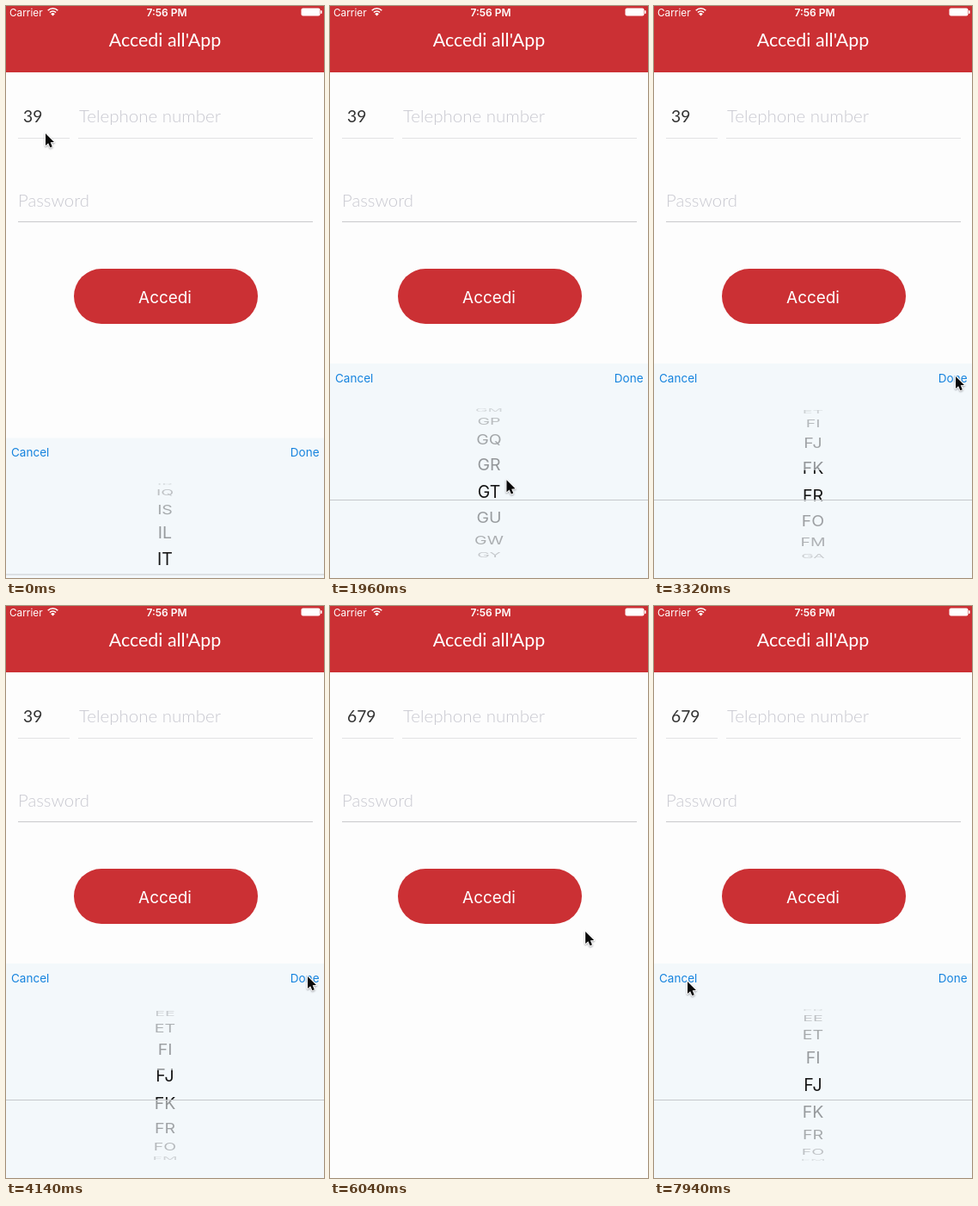
Recreate the animation shown at these times as an HTML page with a canvas. Size 370 by 664 pixels, loop 8000 ms.

```html
<!DOCTYPE html>
<html lang="it">
<head>
<meta charset="utf-8">
<title>Login country picker</title>
<style>
  html, body { margin: 0; width: 100%; height: 100%; overflow: hidden; background: #fdfdfd; }
  canvas { display: block; width: 370px; height: 664px; }
</style>
</head>
<body>
<canvas id="stage"></canvas>
<script>
const W = 370, H = 664, LOOP = 8000;
const canvas = document.getElementById('stage');
const ctx = canvas.getContext('2d');
const dpr = window.devicePixelRatio || 1;
canvas.width = W * dpr;
canvas.height = H * dpr;

const RED = '#cb3034', PAPER = '#fdfdfd', SHEET = '#f3f8fb', INK = '#333333';
const HINT = '#c8c8d0', RULE = '#c9c9cc', FAINT = '#e2e2e4', BLUE = '#1583de', WHITE = '#ffffff';
const UI = 'Inter, Roboto, sans-serif', ROUND = 'Lato, "Open Sans", sans-serif';

// Wheel rows; FJ is position 0
const CODES = ('EG ER EE ET FI FJ FK FR FO FM GA GB GE GG GH GI GN GL GM GP GQ GR GT GU GW GY ' +
  'HN HK HR HT HU ID IE IN IR IQ IS IL IT JM JE JO JP KZ KE').split(' ');
const ZERO = CODES.indexOf('FJ'), FIRST = CODES.indexOf('IT') - ZERO;
const STEP = 20.7 * Math.PI / 180, RADIUS = 88;

const DRAG = 1420, RELEASE = 1600, SETTLED = 5010;
const OPEN = -100, PRESS = 5220, DISMISS = 5340, REOPEN = 6821;
const SHEET_TOP = 415, SLIDE = 340;

// time, x, y of the pointer tip
const POINTER = [
  [350, 46, 148], [1050, 177, 499], [DRAG, 177, 499], [RELEASE, 180, 568],
  [1750, 180, 568], [2460, 300, 485], [2950, 351, 430],
  [5880, 351, 430], [6480, 47.5, 137],
  [7250, 47.5, 137], [7720, 39, 436]
];

const clamp = v => Math.min(1, Math.max(0, v));
const easeOut = u => 1 - (1 - clamp(u)) ** 3;
const smooth = u => u * u * (3 - 2 * u);
const mix = (a, b, u) => a + (b - a) * u;

function pointerAt(t) {
  const next = POINTER.findIndex(k => k[0] > t);
  if (next === 0) return POINTER[0].slice(1);
  if (next < 0) return POINTER[POINTER.length - 1].slice(1);
  const a = POINTER[next - 1], b = POINTER[next];
  const u = smooth((t - a[0]) / (b[0] - a[0]));
  return [mix(a[1], b[1], u), mix(a[2], b[2], u)];
}

function sheetAt(t) {
  const rise = start => mix(H, SHEET_TOP, easeOut((t - start) / SLIDE));
  if (t < DISMISS) return rise(OPEN);
  if (t < REOPEN) return mix(SHEET_TOP, H, easeOut((t - DISMISS) / SLIDE));
  return rise(REOPEN);
}

// Drag, then exponential deceleration
function wheelAt(t) {
  const glide = ms => Math.max(0, 7.29 * Math.exp(-1.68 * (ms - 2460) / 1000) - 0.1);
  if (t < DRAG) return FIRST;
  if (t < RELEASE) return mix(FIRST, glide(RELEASE), ((t - DRAG) / (RELEASE - DRAG)) ** 3);
  return t < SETTLED ? glide(t) : 0;
}

function text(str, x, y, font, color, align = 'left') {
  ctx.font = font;
  ctx.fillStyle = color;
  ctx.textAlign = align;
  ctx.fillText(str, x, y);
}

function rect(x, y, w, h, color) {
  ctx.fillStyle = color;
  ctx.fillRect(x, y, w, h);
}

function pill(x, y, w, h, r, color) {
  ctx.fillStyle = color;
  ctx.beginPath();
  ctx.roundRect(x, y, w, h, r);
  ctx.fill();
}

function drawStatus() {
  text('Carrier', 4, 11.5, `400 11.8px ${UI}`, WHITE);
  text('7:56 PM', 187, 11.5, `600 12px ${UI}`, WHITE, 'center');
  ctx.strokeStyle = WHITE;
  ctx.lineWidth = 1.6;
  for (const r of [5, 8.2]) {
    ctx.beginPath();
    ctx.arc(54.5, 11, r, -Math.PI * 0.75, -Math.PI * 0.25);
    ctx.stroke();
  }
  ctx.fillStyle = WHITE;
  ctx.beginPath();
  ctx.moveTo(54.5, 11.5);
  ctx.arc(54.5, 11.5, 3.3, -Math.PI * 0.75, -Math.PI * 0.25);
  ctx.fill();
  pill(343.5, 2.5, 22, 9, 2, WHITE);
  pill(366, 5, 1.6, 4, 0.8, WHITE);
}

function drawForm(t) {
  rect(0, 0, W, H, PAPER);
  rect(0, 0, W, 77, RED);
  drawStatus();
  text("Accedi all'App", 185, 47.3, `400 21.4px ${ROUND}`, WHITE, 'center');
  text(t < DISMISS ? '39' : '679', 20, 135, `400 19.2px ${ROUND}`, INK);
  text('Telephone number', 85, 135, `300 20.5px ${ROUND}`, HINT);
  text('Password', 14, 233.3, `300 20.3px ${ROUND}`, HINT);
  rect(14, 153, 60, 1, FAINT);
  rect(84, 153, 273, 1, FAINT);
  rect(14, 250, 343, 1, RULE);
  pill(79, 305, 214, 64, 32, RED);
  text('Accedi', 185, 344.6, `400 18.9px ${UI}`, WHITE, 'center');
}

function drawRows(pos, mid, style) {
  const near = Math.round(pos);
  for (let i = near - 4; i <= near + 4; i++) {
    const code = CODES[i + ZERO], angle = (i - pos) * STEP, depth = Math.cos(angle);
    if (!code || Math.abs(angle) > 1.53) continue;
    ctx.save();
    ctx.translate(185, mid + RADIUS * Math.sin(angle));
    ctx.scale(1, depth);
    ctx.globalAlpha = style.fade ? clamp(0.15 + 0.85 * depth) : 1;
    text(code, 0, 7, `400 19.5px ${UI}`, style.color, 'center');
    ctx.restore();
  }
}

function drawSheet(t) {
  const top = sheetAt(t), mid = top + 141, pos = wheelAt(t);
  if (top >= H) return;
  rect(0, top, W, H - top, SHEET);
  text('Cancel', 6, top + 21.8, `400 13.5px ${UI}`, BLUE);
  const dim = t < PRESS ? 0 : t < DISMISS
    ? clamp((t - PRESS) / 80)
    : 1 - clamp((t - DISMISS) / 250);
  ctx.globalAlpha = 1 - 0.4 * dim;
  text('Done', 364.5, top + 21.8, `400 13.5px ${UI}`, BLUE, 'right');
  ctx.globalAlpha = 1;

  drawRows(pos, mid, { color: '#919497', fade: true });
  // Rows inside the selection band turn dark
  ctx.save();
  ctx.beginPath();
  ctx.rect(0, mid - 17, W, 34);
  ctx.clip();
  rect(0, mid - 17, W, 34, SHEET);
  drawRows(pos, mid, { color: '#161616', fade: false });
  ctx.restore();
  rect(0, top + 158, W, 1, '#c6c9cc');
}

function drawPointer([x, y]) {
  ctx.save();
  ctx.translate(x, y);
  ctx.beginPath();
  ctx.moveTo(0, 0);
  for (const [px, py] of [[0, 14], [3.2, 11.2], [5.4, 16.2], [7.8, 15.2], [5.7, 10.3], [10, 10]]) {
    ctx.lineTo(px, py);
  }
  ctx.closePath();
  ctx.lineWidth = 2;
  ctx.lineJoin = 'round';
  ctx.strokeStyle = PAPER;
  ctx.shadowColor = 'rgba(40, 40, 50, 0.4)';
  ctx.shadowBlur = 2 * dpr;
  ctx.shadowOffsetY = dpr;
  ctx.stroke();
  ctx.shadowColor = 'transparent';
  ctx.fillStyle = '#0a0a0a';
  ctx.fill();
  ctx.restore();
}

const start = performance.now();
function render() {
  const t = (performance.now() - start) % LOOP;
  ctx.setTransform(dpr, 0, 0, dpr, 0, 0);
  drawForm(t);
  drawSheet(t);
  drawPointer(pointerAt(t));
  requestAnimationFrame(render);
}
render();
</script>
</body>
</html>
```
